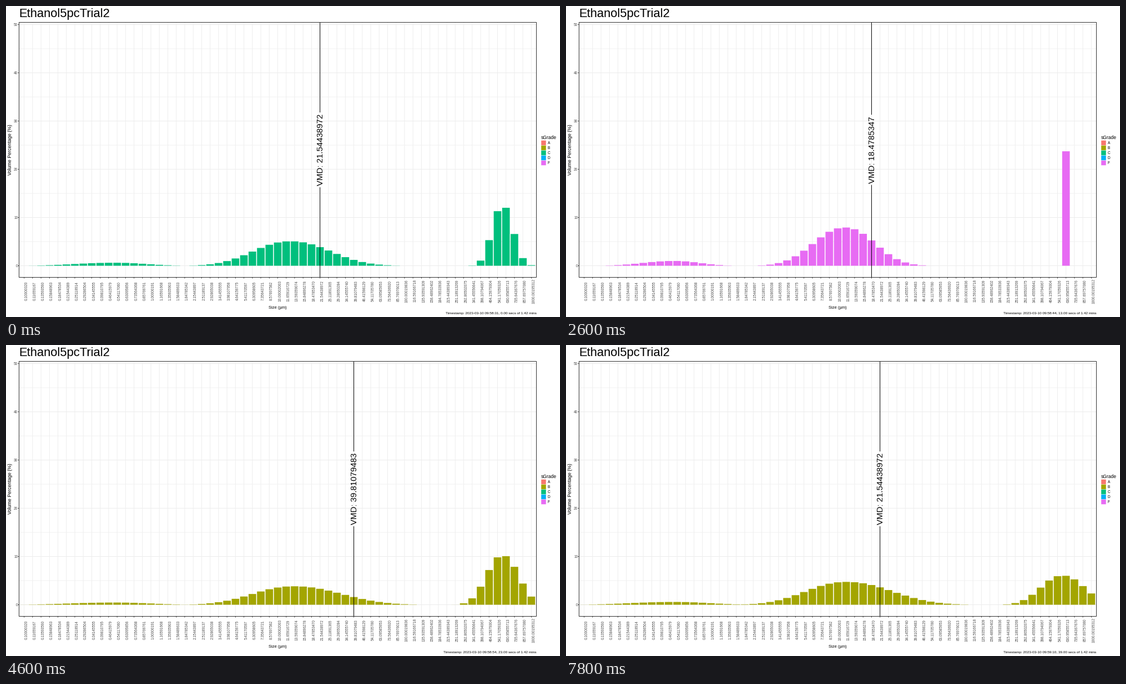
Animation, 998 px wide and 561 px high, one loop 8 s. Source, as a matplotlib script:

```python
import numpy as np
import matplotlib.pyplot as plt
from matplotlib.animation import FuncAnimation
from matplotlib.patches import Rectangle

W, H, DPI = 998, 561, 64
PT = 72 / DPI                     # points per pixel
FRAMES, STEP_MS = 40, 200
LEFT, RIGHT, TOP, BOTTOM = 23.5, 955.5, 29.5, 489.5
PITCH = (RIGHT - LEFT) / 61.2     # 61 bins plus a small margin
UNIT = 8.7                        # pixels per percent
BINS = np.arange(61)
SIZES = np.float32(0.1000001965 * 10 ** (BINS / 15))
GRADES = {"A": "#F8766D", "B": "#A3A500", "C": "#00BF7D",
          "D": "#00B0F6", "F": "#E76BF3"}

# second, grade, median bin, main centre and spread, coarse height and spread
KEYS = [
    (0, "C", 35, 31.5, 6.2, 12.6, 1.72),
    (4, "B", 33, 31.4, 5.2, 13.6, 1.1),
    (10, "F", 30, 30.9, 4.8, 0, 1),
    (16, "F", 38, 30.8, 5.1, 47.5, 0.3),
    (23, "B", 39, 31.9, 7.1, 10.3, 2.6),
    (32, "B", 33, 31.6, 5.4, 10.4, 1.16),
    (39, "B", 35, 31.0, 6.9, 6.1, 3.5),
]


def px(i):
    return LEFT + (i + 0.6) * PITCH


def py(v):
    return 468.5 - UNIT * v


def mode(centre, spread, skew=1):
    """Bell of height 1 whose right side is `skew` times as wide as its left."""
    left = 2 * spread / (1 + skew)
    d = BINS - centre
    return np.exp(-np.abs(d / np.where(d < 0, left, left * skew)) ** 2.15)


def profile(centre, spread, height, width):
    """Volume percentages: coarse mode, the rest shared by main and fine."""
    coarse = height * mode(56.6 + 0.4 * (width < 1.5), width)
    main = mode(centre, spread, 0.45 + 0.1 * spread)
    fine = 0.13 * mode(10.7, 0.95 * spread, 0.8)
    scale = (101.5 - coarse.sum()) / (main + fine).sum()
    return sum(np.clip(m - 0.05, 0, None)
               for m in (coarse, scale * main, scale * fine))


SECONDS = np.array([k[0] for k in KEYS])
MEDIANS = [k[2] for k in KEYS]
PROFILES = np.array([profile(*k[3:]) for k in KEYS])

plt.rcParams["font.family"] = "Liberation Sans"
plt.rcParams["path.snap"] = False
fig = plt.figure(figsize=(W / DPI, H / DPI), dpi=DPI, facecolor="white")
ax = fig.add_axes([0, 0, 1, 1])
ax.set_xlim(0, W)
ax.set_ylim(H, 0)
ax.axis("off")


def label(x, y, s, size, color="black", ha="left", rot=0):
    return ax.text(x, y, s, fontsize=size * PT, color=color, ha=ha,
                   va="baseline", rotation=rot, rotation_mode="anchor", zorder=5)


def line(xs, ys, color, z=1):
    return ax.plot(xs, ys, color=color, lw=PT, zorder=z,
                   solid_capstyle="butt", snap=False)[0]


def box(x, y, w, h, z=2, **style):
    return ax.add_patch(Rectangle((x, y), w, h, zorder=z, snap=False, **style))


# panel grid, ticks and border
for v in range(0, 51, 5):
    major = v % 10 == 0
    line([LEFT, RIGHT], [py(v)] * 2, "#ECECEC" if major else "#F2F2F2")
    if major:
        line([21.5, LEFT], [py(v)] * 2, "#333333")
        label(21.3, py(v) + 2.4, str(v), 6.5, "#4D4D4D", "right")
for i in BINS:
    line([px(i)] * 2, [TOP, BOTTOM], "#EEEEEE")
    line([px(i)] * 2, [BOTTOM, 491.5], "#333333")
    label(px(i) + 5.8, 514, f"{SIZES[i]:.8f}", 6.5, "#4D4D4D", "center", 90)
box(LEFT, TOP, RIGHT - LEFT, BOTTOM - TOP, z=4, fill=False, ec="#333333", lw=PT)

# titles and legend
label(23, 19.5, "Ethanol5pcTrial2", 22)
label(489, 545.8, "Size (µm)", 7.6, ha="center")
label(9.8, 259, "Volume Percentage (%)", 8.6, ha="center", rot=90)
label(964, 240, "sGrade", 8.5)
for n, (name, color) in enumerate(GRADES.items()):
    y = 246.8 + 9.05 * n
    box(964.2, y - 4.2, 8.5, 8.5, fc=color, lw=0)
    label(976, y + 2.4, name, 6.5)

# moving parts
bars = [box(px(i) - 0.45 * PITCH, py(0), 0.9 * PITCH, 0, lw=0) for i in BINS]
upper, lower = (line([0, 0], [0, 0], "black", z=3) for _ in range(2))
vmd = label(0, 259.5, "", 15, ha="center", rot=90)
caption = label(955.5, 556, "", 6.45, ha="right")


def update(sec):
    color = GRADES[KEYS[np.argmin(np.abs(SECONDS - sec))][1]]
    for b, heights in zip(bars, PROFILES.T):
        b.set_height(-UNIT * np.interp(sec, SECONDS, heights))
        b.set_facecolor(color)

    mid = int(round(np.interp(sec, SECONDS, MEDIANS)))
    text = "VMD: " + f"{SIZES[mid]:.8f}".rstrip("0")
    gap = 67.5 - 4.15 * (16 - len(text))
    x = px(mid)
    vmd.set_text(text)
    vmd.set_x(x + 5.2)
    upper.set_data([x, x], [TOP, 259.5 - gap])
    lower.set_data([x, x], [259.5 + gap, BOTTOM])

    minute, s = divmod(58 * 60 + 31 + sec, 60)
    hour, minute = 9 + minute // 60, minute % 60
    caption.set_text(f"Timestamp: 2023-03-10 {hour:02d}:{minute:02d}:{s:02d}, "
                     f"{sec:.2f} secs of 1.42 mins")
    return bars + [upper, lower, vmd, caption]


anim = FuncAnimation(fig, update, frames=FRAMES, interval=STEP_MS,
                     init_func=lambda: update(0), repeat=True, repeat_delay=0)
plt.show()
```
